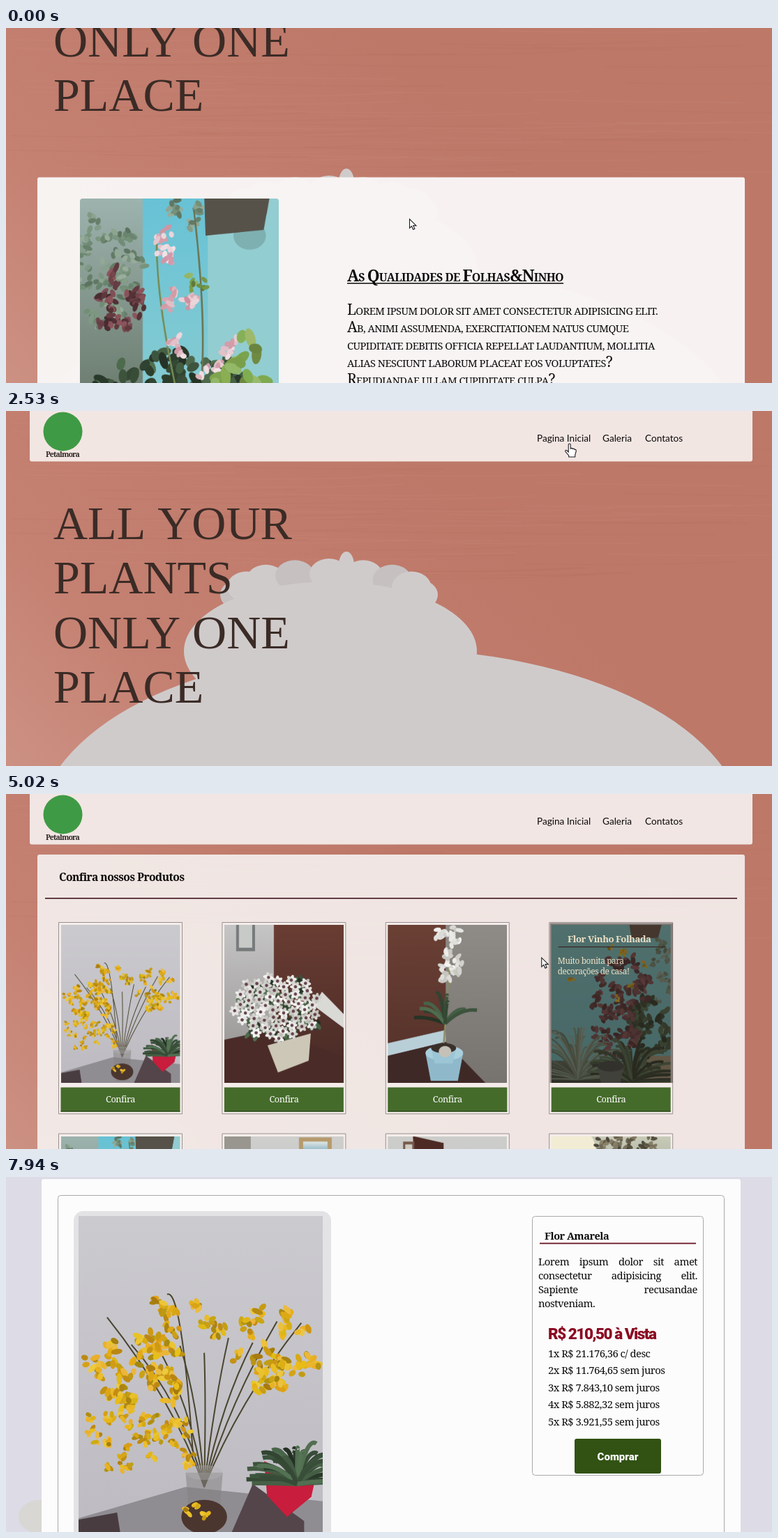
Animation, 1098 px wide and 510 px high, one loop 8.58 s. Source, as an HTML page with a canvas:

```html
<!DOCTYPE html>
<html lang="pt">
<head>
<meta charset="utf-8">
<title>Loja de plantas</title>
<style>
html, body { margin: 0; width: 100%; height: 100%; overflow: hidden; }
canvas { display: block; }
</style>
</head>
<body>
<canvas id="stage" width="1098" height="510"></canvas>
<script>
const stage = document.getElementById('stage').getContext('2d');
const LOOP = 8580, TICK = 124, GALLERY_AT = 3585, PRODUCT_AT = 6105;
let g = stage;

// ---- Motion
const ramp = (t, from, to) => Math.min(1, Math.max(0, (t - from) / (to - from)));

const scrollAt = [
  t => 300 + 420 * ramp(t, 130, 1130) - 720 * ramp(t, 1300, 1788),
  t => 275 * (ramp(t, 3600, 4100) - ramp(t, 4293, 4640)),
  t => 200 * ramp(t, 6740, 7220) - 116 * ramp(t, 7220, 7690)
];

const hoverAt = {
  2: t => ramp(t, 5400, 5800),
  3: t => ramp(t, 3640, 4100) - ramp(t, 5020, 5300)
};

// Stops of the mouse: time, x, y
const mousePath = [[1300, 578, 274], [1612, 638, 200], [2230, 753, 48], [2728, 862, 46], [3340, 780, 215],
  [4880, 778, 217], [5900, 641, 443], [6110, 641, 443], [7690, 858, 398], [7930, 1030, 492]];

function mouseAt(t) {
  let [, x, y] = mousePath[0];
  mousePath.slice(1).forEach(([end, x2, y2], i) => {
    const p = ramp(t, mousePath[i][0], end);
    x += (x2 - x) * p;
    y += (y2 - y) * p;
  });
  return [x, y];
}

// ---- Drawing helpers
let seed = 1;
const random = () => (seed = seed * 16807 % 2147483647) / 2147483647;
const around = (middle, reach) => middle + (random() * 2 - 1) * reach;
const shade = ([h, s, l], reach = 12) => `hsl(${around(h, 4)} ${s}% ${around(l, reach)}%)`;

function rect(color, x, y, w, h) { g.fillStyle = color; g.fillRect(x, y, w, h); }

function fade(top, bottom, x, y, w, h) {
  const blend = g.createLinearGradient(0, y, 0, y + h);
  blend.addColorStop(0, top);
  blend.addColorStop(1, bottom);
  rect(blend, x, y, w, h);
}

function rounded(x, y, w, h, r, fill, stroke) {
  g.beginPath();
  g.roundRect(x, y, w, h, r);
  if (fill) { g.fillStyle = fill; g.fill(); }
  if (stroke) { g.strokeStyle = stroke; g.lineWidth = 1; g.stroke(); }
}

function oval(color, x, y, rx, ry = rx, turn = 0) {
  g.fillStyle = color;
  g.beginPath();
  g.ellipse(x, y, rx, ry, turn, 0, Math.PI * 2);
  g.fill();
}

function poly(color, ...points) {
  g.fillStyle = color;
  g.beginPath();
  for (let i = 0; i < points.length; i += 2) g.lineTo(points[i], points[i + 1]);
  g.fill();
}

function stem(color, width, x1, y1, cx, cy, x2, y2) {
  g.strokeStyle = color;
  g.lineWidth = width;
  g.beginPath();
  g.moveTo(x1, y1);
  g.quadraticCurveTo(cx, cy, x2, y2);
  g.stroke();
}

// Clumps of petals or leaves scattered inside an ellipse
function spray(tone, x, y, rx, ry, size, density = 1) {
  for (let n = density * rx * ry / size ** 2; n > 0; n -= 4) {
    const a = random() * 7, d = Math.sqrt(random());
    const cx = x + Math.cos(a) * d * rx, cy = y + Math.sin(a) * d * ry;
    for (let k = 0; k < 4; k++)
      oval(shade(tone), around(cx, size * 1.3), around(cy, size * 1.3), around(size, size * .3), size * .6, random() * 3);
  }
}

// Blades fanning out upward from one point
function blades(tone, x, y, reach, count, width) {
  for (let i = 0; i < count; i++) {
    const a = Math.PI * (1 + random()), r = around(reach, reach * .25);
    const px = Math.cos(a) * r, py = Math.sin(a) * r;
    stem(shade(tone), width, x, y, x + px / 2, y + py, x + px, y + py * .85);
  }
}

function pot(color, rim, x, y, w, h) {
  poly(color, x - w / 2, y, x + w / 2, y, x + w * .36, y + h, x - w * .36, y + h);
  oval(rim, x, y, w / 2, w / 5);
}

function text(str, x, y, font, color, align = 'left', spacing = 0) {
  g.font = font;
  g.letterSpacing = spacing + 'px';
  g.textAlign = align;
  g.fillStyle = color;
  g.fillText(str, x, y);
  return g.measureText(str).width;
}

function slab(str, x, y, size, { weight = 500, color = '#0c0a0a', align = 'left' } = {}) {
  const px = size * .91;
  return text(str, x, y, `${weight} ${px}px "Noto Serif", serif`, color, align, -px * .035);
}

function smallCaps(str, x, y, size, weight) {
  for (const run of str.match(/[A-Z&?]+|[^A-Z&?]+/g)) {
    const big = /[A-Z&?]/.test(run);
    x += slab(run.toUpperCase(), x, y, big ? size : size * .7, { weight });
  }
  return x;
}

function justified(str, x, y, width, size) {
  const words = str.split(' ');
  slab('', 0, 0, size);
  const widths = words.map(w => g.measureText(w).width);
  const gap = (width - widths.reduce((a, b) => a + b)) / (words.length - 1);
  words.forEach((w, i) => { slab(w, x, y, size); x += widths[i] + gap; });
}

// ---- Photos, painted once on a 171 x 227 field
const W = 171, H = 227;
const gold = [45, 82, 47], white = [50, 6, 85], leaf = [120, 16, 28], sage = [130, 11, 52], lime = [85, 36, 46],
  wine = [352, 25, 33], pink = [345, 38, 80], red = [352, 76, 42];

const scenes = [
  function yellowSprays() {
    fade('#cbcacf', '#bdbbc1', 0, 0, W, H);
    poly('#8f8d92', 0, 212, 75, 190, W, 200, W, H, 0, H);
    poly('#493c40', 0, 213, 27, 208, 30, H, 0, H);
    poly('#54454a', 105, H, 122, 188, 158, 214, 158, H);
    for (let x = 20; x < 160; x += 17) stem('#4b4630', 1, 88, 190, 60 + x / 3, 130, x, around(85, 15));
    stem('#4b4630', 1, 80, 165, 72, 50, 62, 55);
    spray(gold, 40, 106, 36, 32, 3.2, 1.25);
    spray(gold, 138, 97, 29, 34, 3.2, 1.1);
    for (let x = 10; x < 78; x += 11) spray(gold, x, 152, 4, around(26, 10), 2.4);
    for (let x = 56; x < 104; x += 14) spray(gold, x, around(72, 14), 8, 10, 2.8);
    pot('#8582848c', '#b4b2b466', 88, 180, 26, 45);
    oval('#4b352f', 88, 211, 16, 12);
    spray(gold, 86, 207, 12, 5, 2.4);
    poly('#c81d3d', 130, 172, 165, 188, 163, 197, 146, 211, 132, 196);
    blades(leaf, 153, 188, 30, 40, 3);
  },
  function daisies() {
    fade('#6a3d33', '#472a26', 0, 0, W, H);
    fade('#c6c5c5', '#9f9d9c', 0, 0, 71, 165);
    rect('#777b7b', 17, 0, 27, 38);
    rect('#c8cac8', 21, 0, 19, 33);
    poly('#d9d9d6', 140, 96, W, 128, W, 148, 128, 116);
    poly('#4a2b27', 0, 165, 70, 150, W, 190, W, H, 0, H);
    spray(leaf, 78, 124, 58, 48, 5, 1.6);
    poly('#cdc7b7', 62, 173, 124, 156, 121, 195, 77, 212);
    for (let i = 0; i < 55; i++) {
      const a = i * 2.4, d = Math.sqrt(i / 55), x = 76 + Math.cos(a) * d * 64, y = 118 + Math.sin(a) * d * 46;
      for (let k = 0; k < 3; k++) oval(shade(white), x, y, 8, 3, k + a);
      oval('#66434a', x, y, 2.3);
    }
  },
  function whiteOrchid() {
    fade('#8f8b86', '#77736f', 0, 0, W, H);
    fade('#6b4035', '#58342c', 0, 0, 83, 175);
    poly('#b9cfd8', 0, 170, 83, 151, 83, 168, 0, 188);
    poly('#3f2926', 0, 188, 83, 168, 140, H, 0, H);
    stem('#8b8a62', 2.5, 79, 185, 84, 130, 90, 20);
    spray(white, 84, 20, 17, 16, 5, 2.4);
    spray(white, 90, 64, 14, 27, 5, 2.2);
    blades(leaf, 82, 142, 44, 9, 5);
    pot('#8fb9cb', '#a9cfdd', 81, 184, 54, 40);
    pot('#9cc5d5', '#39302c', 80, 177, 36, 22);
    oval('#c6c1b8', 82, 182, 9, 8);
  },
  function wineBush() {
    fade('#7fd0d4', '#68bfc4', 0, 0, W, H);
    poly('#675148', 112, 0, 158, 0, 153, 19, 115, 20);
    spray(sage, 160, 70, 12, 60, 4);
    rect('#a8977a', 130, 188, 41, 39);
    spray(leaf, 138, 155, 36, 50, 6, 2);
    spray(wine, 100, 92, 40, 46, 5, 1.6);
    spray(wine, 96, 145, 32, 44, 5, 1.6);
    spray(gold, 82, 70, 56, 42, 3, .1);
    fade('#566a5e', '#333f38', 0, 195, 128, 32);
    blades(sage, 38, 222, 72, 50, 2.4);
    blades(leaf, 115, 225, 60, 40, 4);
    pot('#5d6866', '#3c4442', 85, 203, 38, 24);
  },
  function gardenOrchids() {
    rect('#92cdd1', 0, 0, W, H);
    fade('#67c2d5', '#86cbd2', 52, 0, 58, 165);
    fade('#9db3ae', '#6d7d70', 0, 0, 54, 165);
    oval('#7eb0b2', 146, 32, 14, 12);
    poly('#575249', 107, 0, 163, 0, 158, 27, 108, 32);
    spray(sage, 22, 55, 30, 55, 3.5, 1.2);
    spray(sage, 90, 18, 16, 24, 3.5, .8);
    spray(wine, 31, 84, 22, 33, 3.5, 1.3);
    fade('#4c5b45', '#2e3a2b', 0, 165, W, 62);
    spray(leaf, 80, 172, 76, 38, 6, 1.6);
    stem('#788a52', 1.5, 84, 170, 66, 90, 66, 38);
    stem('#6b7352', 1.5, 105, 150, 108, 95, 98, 10);
    spray(lime, 102, 72, 13, 8, 3);
    for (const [x, y] of [[72, 34], [74, 50], [80, 88], [94, 86], [87, 126], [128, 129], [112, 145]])
      spray(pink, x, y, 8, 7, 3.6, 2.5);
    blades([80, 30, 65], 44, 222, 58, 40, 2);
    spray(lime, 143, 158, 26, 32, 7, 1.6);
    spray(lime, 143, 210, 28, 16, 7, 2);
  },
  function pottedPlant() {
    fade('#cfcfcd', '#b8b9b7', 0, 0, W, 165);
    rect('#98968f', 0, 0, 38, 130);
    for (const [x, y, w, h, frame] of [[107, 2, 47, 38, '#b69a6d'], [50, 22, 40, 35, '#725149']]) {
      rect(frame, x, y, w, h);
      fade('#dfe7e6', '#3d83a4', x + 6, y + 6, w - 12, h - 12);
    }
    rect('#70312a', 0, 92, 34, 68);
    rect('#743329', 51, 94, 54, 62);
    poly('#878b86', 0, 160, 70, 145, W, 160, W, H, 0, H);
    spray(red, 9, 70, 12, 25, 4, 1.5);
    stem('#67794f', 1.5, 82, 180, 72, 100, 78, 22);
    spray(sage, 80, 38, 12, 20, 2.5, .6);
    blades(leaf, 82, 165, 46, 22, 5);
    spray(leaf, 82, 148, 24, 28, 5);
    pot('#e6e6e3', '#4a4035', 84, 181, 42, 38);
  },
  function redOrchid() {
    fade('#cdcecb', '#bdbebb', 0, 0, W, H);
    poly('#4d2b24', 36, 0, 80, 10, 80, 120, 42, 120);
    rect('#75584b', 22, 8, 16, 40);
    rect('#cfccc2', 25, 12, 10, 32);
    rect('#4f8ea6', 154, 40, 17, 26);
    poly('#6a6a66', 0, 182, 70, 165, W, 190, W, H, 0, H);
    poly('#69352c', 138, 158, W, 145, W, 206, 150, 200);
    spray(red, 88, 105, 36, 36, 5, 1.8);
    spray(red, 106, 64, 32, 12, 4.5, 1.6);
    for (const x of [25, 142]) spray(red, x, 115, 16, 36, 4.5, 1.4);
    spray(leaf, 66, 163, 30, 15, 6, 2);
    pot('#594e4a', '#3a302d', 84, 182, 42, 45);
    spray(sage, 82, 202, 16, 18, 3, .6);
  },
  function backlitBush() {
    fade('#c9cbb9', '#4b584a', 0, 0, W, H);
    oval('#f1ecd3', 22, 22, 42, 40);
    spray(lime, 8, 62, 14, 40, 4);
    spray([45, 14, 36], 112, 20, 52, 26, 4, 1.3);
    rect('#a29b8c', 0, 205, 70, 22);
    spray(leaf, 86, 115, 72, 78, 5, .9);
    spray(sage, 84, 105, 68, 68, 4.5, 1);
    oval('#604b40', 92, 150, 17, 9);
    spray(leaf, 95, 200, 70, 26, 5, 1.6);
    spray(white, 60, 120, 50, 80, 3, .12);
  },
  function roofCorner() {
    fade('#8ccdd1', '#7db9bd', 0, 0, W, H);
    poly('#66b9c6', 0, 0, 48, 0, 50, 60, 0, 90);
    poly('#eef1f0', 30, 0, 128, 0, 98, 26, 74, 27, 48, 16);
    stem('#4b5653', 3, 17, 24, 60, 25, 100, 28);
    stem('#55605c', 3, 48, 0, 47, 12, 82, 26);
    spray(sage, 113, 30, 14, 22, 3);
    spray(leaf, 80, 155, 80, 80, 6, 1.6);
  }
];

const photos = scenes.map((paint, i) => {
  const canvas = document.createElement('canvas');
  canvas.width = 350;
  canvas.height = 465;
  g = canvas.getContext('2d');
  g.scale(350 / W, 465 / H);
  seed = 4711 + i * 977;
  paint();
  return canvas;
});
g = stage;
g.imageSmoothingQuality = 'high';

function photo(i, x, y, w, h, r = 0) {
  g.save();
  g.beginPath();
  g.roundRect(x, y, w, h, r);
  g.clip();
  g.drawImage(photos[i], x, y, w, h);
  g.restore();
}

// ---- Pages
function wall(withFlower) {
  const clay = g.createLinearGradient(0, 510, 520, 0);
  clay.addColorStop(0, '#cc9183');
  clay.addColorStop(.35, '#c48071');
  clay.addColorStop(1, '#bd7868');
  rect(clay, 0, 0, 1098, 510);
  seed = 77;
  for (let i = 0; i < 70; i++) {
    const y = random() * 240, x = random() * 900;
    stem(i % 2 ? '#d08f7e1c' : '#a963551c', 2, x, y, x + 150, y + 4, x + 300, around(y, 5));
  }
  if (!withFlower) return;
  const petal = '#d0cbcb';
  for (let i = 0; i <= 8; i++) {
    const a = Math.PI * i / 8;
    oval(i % 3 ? petal : '#c6c0c1', 463 - 128 * Math.cos(a), 264 - 30 * Math.sin(a), 28, 22);
  }
  oval(petal, 488, 222, 11, 20);
  oval(petal, 465, 345, 210, 100);
  oval(petal, 552, 600, 506, 258);
}

function header(scroll, color) {
  const y = -scroll;
  rounded(34, y - 5, 1036, 77.5, 3, color);
  oval('#3f9a45', 81.5, y + 29.5, 28);
  text('Petalmora', 81, y + 66, '600 10.5px "Noto Serif", serif', '#2b2322', 'center', -.8);
  const font = '13.6px Lato, sans-serif';
  text('Pagina Inicial', 761, y + 43.5, font, '#0c0a0a');
  text('Galeria', 855, y + 43.5, font, '#0c0a0a');
  text('Contatos', 916, y + 43.5, font, '#0c0a0a');
}

const praise = ['Lorem ipsum dolor sit amet consectetur adipisicing elit.',
  'Ab, animi assumenda, exercitationem natus cumque',
  'cupiditate debitis officia repellat laudantium, mollitia',
  'alias nesciunt laborum placeat eos voluptates?', 'Repudiandae ullam cupiditate culpa?'];

function homePage(scroll) {
  wall(true);
  header(scroll, '#f2e6e2');
  ['ALL YOUR', 'PLANTS', 'ONLY ONE', 'PLACE'].forEach((line, i) =>
    text(line, 68, 184 + i * 78.4 - scroll, '68px "Liberation Serif", serif', '#3b2b26'));
  rounded(45, 514.5 - scroll, 1014, 1100, 3, 'rgba(248,245,244,.98)');
  [4, 8].forEach((picture, i) => {
    const y = 476 * i - scroll;
    photo(picture, 106, 545 + y, 285, 379, 4);
    const end = smallCaps('As Qualidades de Folhas&Ninho', 489, 663.5 + y, 25, 600);
    rect('#0c0a0a', 489, 666 + y, end - 489, 1.5);
    praise.forEach((line, n) => smallCaps(line, 489, 712 + n * 25.1 + y, 23, 400));
    rect('#b27875', 76, 959 + y, 972, 1.8);
  });
}

const captions = { 2: ['Flor Branca Cumprida', 'parede!'], 3: ['Flor Vinho Folhada', 'casa!'] };

function card(i, scroll, time) {
  const x = 75.5 + i % 4 * 234.4, y = 184.5 + Math.floor(i / 4) * 303.5 - scroll;
  rounded(x, y, 177, 275, 0, 'rgba(255,255,255,.25)', '#989190');
  photo(i, x + 3, y + 3.5, W, H);
  rect('#456b2b', x + 3, y + 237, W, 35);
  rect('#2f4d1d', x + 3, y + 270.5, W, 1.5);
  slab('Confira', x + 88.5, y + 258.5, 14, { color: '#fff', align: 'center' });
  if (!hoverAt[i]) return;
  g.globalAlpha = hoverAt[i](time);
  rect('rgba(42,34,26,.55)', x + 1, y + 1, 176, 229.5);
  const [name, use] = captions[i], color = '#eee0c6';
  slab(name, x + 86, y + 28.5, 14.5, { weight: 700, color, align: 'center' });
  rect('#3a2b25', x + 13, y + 34.5, 154, 1.3);
  slab('Muito bonita para', x + 12, y + 59, 13, { color });
  slab('decorações de ' + use, x + 12, y + 74, 13, { color });
  g.globalAlpha = 1;
}

function galleryPage(scroll, time) {
  wall(scroll > 100);
  header(scroll, '#f1e6e3');
  rounded(45, 87 - scroll, 1014, 1100, 3, 'rgba(248,247,246,.86)');
  slab('Confira nossos Produtos', 76, 124.5 - scroll, 17.2, { weight: 600 });
  rect('#4a1f28', 56, 149 - scroll, 992, 1.7);
  for (let i = 0; i < 8; i++) card(i, scroll, time);
}

function productPage(scroll) {
  rect('#dddbe5', 0, 0, 1098, 510);
  oval('#d8d7d3', 48, 488, 30, 24);
  header(scroll, '#fafafa');
  g.save();
  g.translate(0, 84 - scroll);
  rounded(51, 3, 1002, 671, 3, '#fcfcfc');
  rounded(74.5, 26.5, 955, 620, 4, null, '#a9a9ab');
  rounded(97, 49, 369, 479, 14, '#e3e3e6');
  photo(0, 104, 56, 350, 465);
  rounded(754.5, 56.5, 245, 372, 4, null, '#a9a9ab');
  slab('Flor Amarela', 772, 90, 16, { weight: 600 });
  rect('#6b1424', 765, 94.5, 224, 1.8);
  ['Lorem ipsum dolor sit amet', 'consectetur adipisicing elit.', 'Sapiente recusandae']
    .forEach((line, i) => justified(line, 763, 127 + i * 20, 228, 16.3));
  slab('nostveniam.', 763, 187, 16.3);
  text('R$ 210,50 à Vista', 777, 232.5, '900 22.5px Roboto, sans-serif', '#8b0a22', 'left', -1.5);
  ['21.176,36 c/ desc', '11.764,65 sem juros', '7.843,10 sem juros', '5.882,32 sem juros', '3.921,55 sem juros']
    .forEach((line, i) => slab(`${i + 1}x R$ ${line}`, 777, 258.5 + i * 24.5, 16.3));
  rounded(815, 376, 124, 50, 3, '#315213');
  text('Comprar', 877, 406.5, '900 15px Roboto, sans-serif', '#fff', 'center');
  g.restore();
}

// ---- Mouse pointer
const arrow = new Path2D('M.5 .5V13.5L3.5 10.7L5.7 15.6L7.9 14.6L5.8 9.9H10Z');
const hand = new Path2D('M-1.5 1Q0-1 1.5 1V7Q4 5.5 4.5 7.5Q7 6.5 7.5 8.5Q10 8 9.5 11L8 16V19H-1V17L-6 11Q-6 8-3.5 10L-1.5 12Z');
const links = [[755, 28, 225, 24], [547, 421, 171, 36], [815, 376, 124, 50]];

function pointer(page, x, y) {
  const [left, top, w, h] = links[page];
  const onLink = x > left && x < left + w && y > top && y < top + h;
  const shape = onLink ? hand : arrow;
  g.save();
  g.translate(x, y);
  g.fillStyle = '#fff';
  g.strokeStyle = '#1c1c22';
  g.lineWidth = 1.1;
  g.fill(shape);
  g.stroke(shape);
  g.restore();
}

function draw() {
  const now = performance.now() % LOOP;
  const time = Math.floor(now / TICK) * TICK;
  const page = now < GALLERY_AT ? 0 : now < PRODUCT_AT ? 1 : 2;
  [homePage, galleryPage, productPage][page](Math.round(scrollAt[page](time)), time);
  if (time < mousePath.at(-1)[0]) pointer(page, ...mouseAt(time));
  requestAnimationFrame(draw);
}
draw();
</script>
</body>
</html>
```
